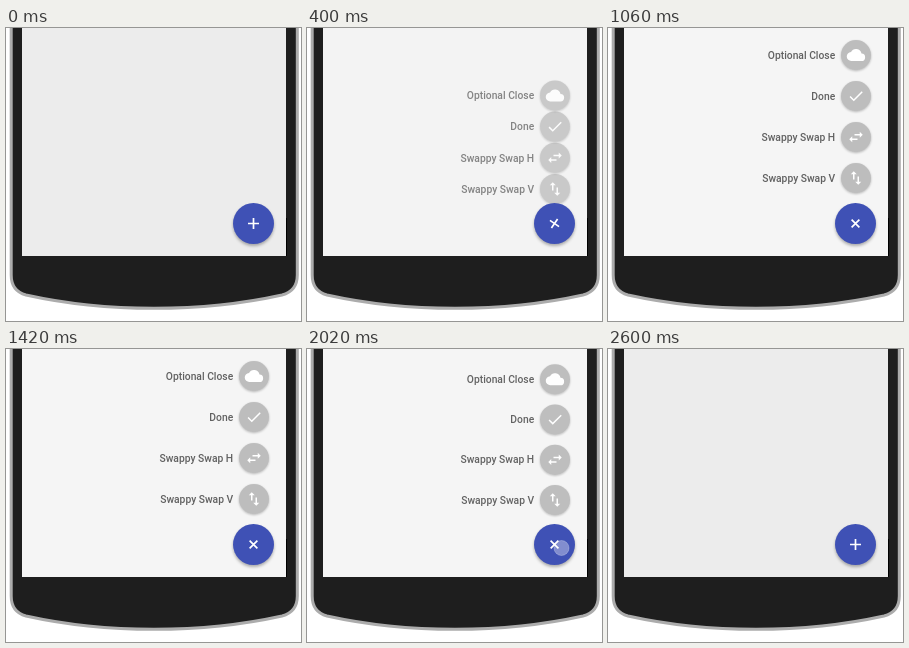
An HTML page for the animation above (2.62 s loop, 295 by 293 pixels).

```html
<!DOCTYPE html>
<html lang="en">
<head>
<meta charset="utf-8">
<title>Speed dial</title>
<style>
  html, body { margin: 0; width: 100%; height: 100%; overflow: hidden; background: #fff; }
  svg { display: block; }
  text { font: 500 10.3px Roboto, sans-serif; fill: #616161; text-anchor: end; }
  .disc { fill: #bdbdbd; filter: drop-shadow(0 1px 1px rgba(0, 0, 0, .25)); }
  .fab { fill: #3f51b5; filter: drop-shadow(0 2px 1.5px rgba(0, 0, 0, .3)); }
</style>
</head>
<body>
<svg width="295" height="293">
  <path d="M5.2-5V247Q5.2 263 20 267Q80 280.3 148 280.3T276 267Q291.3 263 291.3 247V-5Z"
        fill="#1e1e1e" stroke="#acacac" stroke-width="3"/>
  <rect id="screen" x="16" width="264" height="228"/>
  <path d="M280.5 190V228" stroke="#000"/>
  <g id="items"></g>
  <circle class="fab" cx="247.5" cy="195.5" r="20.5"/>
  <path id="plus" d="M-5.5 0H5.5M0-5.5V5.5" stroke="#fff" stroke-width="1.7"/>
  <circle id="touch" cx="254.5" cy="199" r="7.5" fill="#fff" fill-opacity=".35"
          stroke="#fff" stroke-opacity=".25"/>
</svg>
<script>
const LOOP = 2620, FAB_X = 247.5, FAB_Y = 195.5;
const $ = id => document.getElementById(id);

const entries = [
  ['Swappy Swap V', 'M16 17V10h-2v7h-3l4 4 4-4zM9 3L5 7h3v7h2V7h3z'],
  ['Swappy Swap H', 'M7 11l-4 4 4 4v-3h7v-2H7zM21 9l-4-4v3h-7v2h7v3z'],
  ['Done', 'M9 16.2L4.8 12l-1.4 1.4L9 19 21 7l-1.4-1.4z'],
  ['Optional Close', 'M19.35 10A7.5 7.5 0 0 0 5.35 8A6 6 0 0 0 6 20h13a5 5 0 0 0 .35-10z']
];

$('items').innerHTML = entries.map(([label, icon]) => `<g>
  <text x="-20.3" y="3.8">${label}</text>
  <circle class="disc" cx=".5" r="15"/>
  <path d="${icon}" fill="#fff" transform="translate(-8.5 -9) scale(.75)"/>
</g>`).join('');
const items = [...$('items').children];

const ramp = (t, start, end) => Math.min(1, Math.max(0, (t - start) / (end - start)));
const ease = x => (1 - Math.cos(Math.PI * x)) / 2;

function draw(now) {
  const t = now % LOOP;
  const open = ease(ramp(t, 310, 445)) - ease(ramp(t, 2009, 2144));
  const grey = 236 + 9 * open;
  $('screen').setAttribute('fill', `rgb(${grey},${grey},${grey})`);
  items.forEach((item, i) => {
    const y = FAB_Y - (45.5 + 41 * i) * open;
    item.setAttribute('transform', `translate(${FAB_X} ${y})`);
    item.setAttribute('opacity', open);
  });
  $('plus').setAttribute('transform', `translate(${FAB_X} ${FAB_Y}) rotate(${45 * open})`);
  $('touch').setAttribute('opacity', ramp(t, 1920, 1960) * (1 - ramp(t, 2030, 2130)));
}

const start = performance.now();
function tick() {
  draw(performance.now() - start);
  requestAnimationFrame(tick);
}
tick();
</script>
</body>
</html>
```
